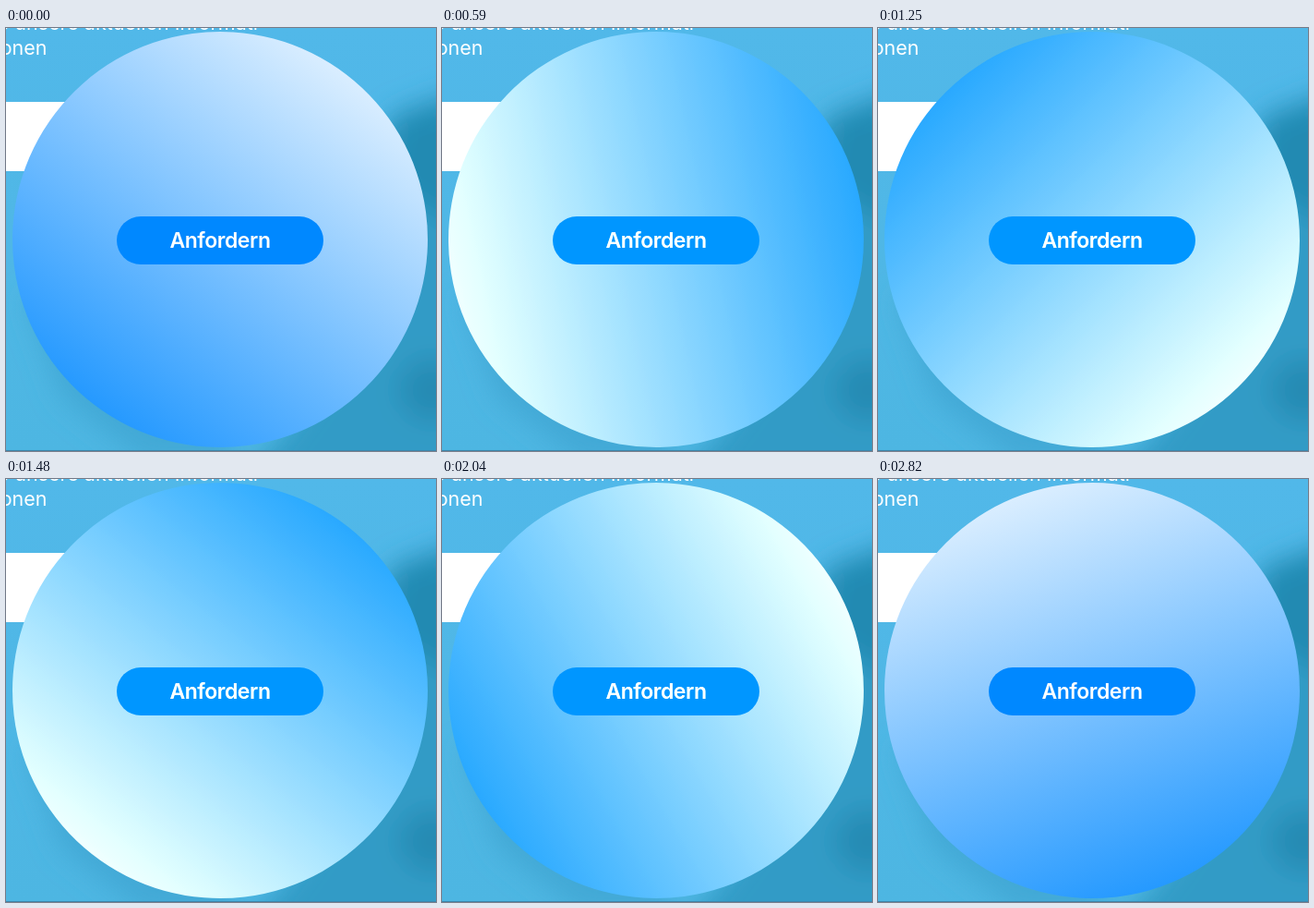
These frames come from a looping animation (466 px wide and 458 px high, 2850 ms). An HTML page:

```html
<!DOCTYPE html>
<html lang="de">
<head>
<meta charset="utf-8">
<style>
  html, body { margin: 0; width: 100%; height: 100%; overflow: hidden; background: #4fb7e6; }
  svg, #widget, #disc, #button { position: absolute; }
  svg, #widget { left: 0; top: 0; width: 466px; height: 458px; }
  #disc {
    left: 7px; top: 4px; width: 450px; height: 450px; border-radius: 50%;
    background: linear-gradient(45deg, #08f, #fff);
  }
  #button {
    left: 120px; top: 203.5px; width: 224px; height: 52.5px; border-radius: 27px;
    background: #08f; color: #fff; text-align: center;
    font: 600 23px/53px Inter, sans-serif; letter-spacing: -0.02em;
  }
</style>
</head>
<body>
<svg viewBox="0 0 466 458">
  <defs>
    <filter id="soft" x="-50%" y="-50%" width="200%" height="200%"><feGaussianBlur stdDeviation="14"/></filter>
    <linearGradient id="base" x2="0" y2="1">
      <stop stop-color="#51b8e9"/><stop offset="1" stop-color="#4db6e2"/>
    </linearGradient>
  </defs>
  <rect width="466" height="458" fill="url(#base)"/>
  <g filter="url(#soft)">
    <path d="M500 62 L420 92 L360 180 L380 330 L300 440 L250 500 L500 500Z" fill="#319bc6"/>
    <path d="M500 78 L425 98 L410 170 L500 220Z" fill="#248ab2"/>
    <ellipse cx="462" cy="392" rx="36" ry="34" fill="#258bb4"/>
    <path d="M20 290 L60 400 L150 470 L250 470 L200 300Z" fill="#42a9d6"/>
  </g>
  <rect y="457" width="466" height="1" fill="#3b86ac"/>
  <rect y="80" width="150" height="75" fill="#fff"/>
  <g fill="#fff" font-family="Inter, sans-serif" font-size="21.5" text-anchor="end">
    <text x="273" y="1.5">Sie unsere aktuellen Informati</text>
    <text x="44.5" y="29">onen</text>
  </g>
</svg>
<div id="widget">
  <div id="disc"></div>
  <div id="button">Anfordern</div>
</div>
<script>
  const LOOP = 2850, TURN = 1000;
  const widget = document.getElementById('widget');
  const disc = document.getElementById('disc');
  const start = performance.now();

  const smooth = (from, to, t) => {
    const p = Math.min(1, Math.max(0, (t - from) / (to - from)));
    return p * p * (3 - 2 * p);
  };

  function draw(now) {
    const t = Math.max(0, now - start) % LOOP;
    // The spin starts slightly behind its steady pace.
    const lag = 8 * Math.max(0, 1 - t / 300);
    const glow = smooth(50, 350, t) - smooth(2500, 2800, t);
    disc.style.transform = `rotate(${360 * t / TURN - lag}deg)`;
    widget.style.filter = `brightness(${1 + 0.1 * glow})`;
    requestAnimationFrame(draw);
  }
  draw(start);
</script>
</body>
</html>
```
